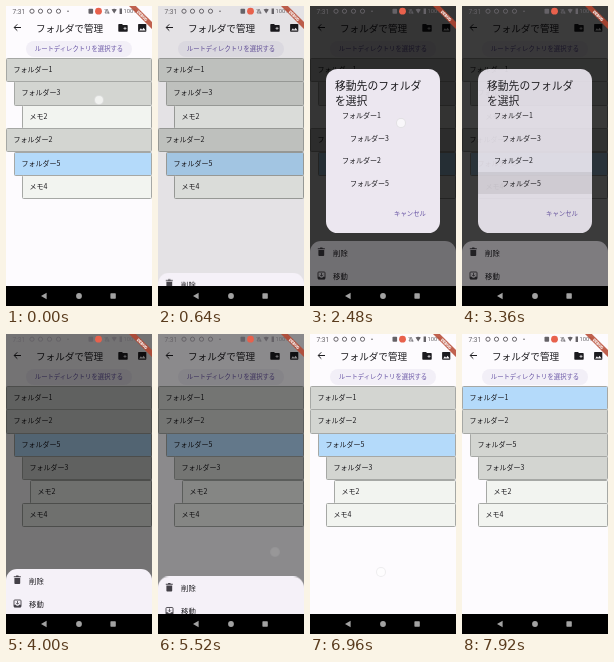
Write an HTML page that moves like this. It is 146 by 300 pixels and loops after 8 s.

```html
<!DOCTYPE html>
<html lang="ja">
<head>
<meta charset="utf-8">
<title>フォルダで管理</title>
<style>
  html, body { margin: 0; width: 100%; height: 100%; overflow: hidden; }
  #stage {
    position: relative; width: 146px; height: 300px; overflow: hidden;
    background: #fdfbfe; color: #1c1b1f;
    font: 7px/1 "Noto Sans CJK JP", "Noto Sans CJK", sans-serif;
  }
  #stage div, #stage svg { position: absolute; box-sizing: border-box; }
  .full { inset: 0; }
  .label { white-space: nowrap; line-height: 12px; height: 12px; }
  .anim { animation: 8s linear infinite both; }

  #title { left: 30px; top: 16px; font-size: 9.6px; }
  #pick {
    left: 20px; top: 35px; width: 106px; height: 16px; border-radius: 8px;
    background: #f2eff7; color: #6753a4; font-size: 6.35px;
    line-height: 16px; text-align: center; white-space: nowrap;
  }
  .row {
    right: 0; height: 24.3px; padding-left: 6.5px; line-height: 21.5px;
    border: 1px solid #a6a8a5; border-radius: 1.5px;
    background: #d3d5d1; white-space: nowrap;
  }
  .memo { background: #f2f4f0; }
  .picked { background: #b4dafa; }

  #before { animation-name: before; }
  #after { animation-name: after; }
  #after .folder1 { animation-name: select; }
  #after .folder5 { animation-name: deselect; }
  .shade { background: #000; }
  #shade1 { animation-name: shade; }
  #sheet {
    left: 0; top: 235px; width: 146px; height: 60px;
    border-radius: 11px 11px 0 0; background: #f5f1f8;
    animation-name: sheet; font-size: 7.4px;
  }
  #press { left: 0; top: 23px; width: 146px; height: 23px; background: #000; animation-name: press; }
  #modal { animation-name: modal; }
  #dialog {
    left: 16px; top: 63px; width: 114px; height: 164px; border-radius: 11.5px;
    background: #ece7f0; overflow: hidden;
  }
  #choice { left: 0; top: 103px; width: 114px; height: 22px; background: #000; animation-name: choice; }
  .head { font-size: 10.8px; line-height: 15px; white-space: nowrap; }
  #cancel { left: 68px; top: 139px; font-size: 6.4px; color: #6753a4; }
  #navbar { left: 0; top: 280px; width: 146px; height: 20px; background: #000; }

  .touch {
    width: 10px; height: 10px; margin: -5px; border-radius: 50%;
    background: rgba(255,255,255,.68); border: .6px solid rgba(120,120,120,.18);
  }

  @keyframes before { 0%, 42.99% { visibility: visible } 43%, 100% { visibility: hidden } }
  @keyframes after { 0%, 42.99% { visibility: hidden } 43%, 100% { visibility: visible } }
  @keyframes shade {
    0%, 7.5% { opacity: 0; animation-timing-function: ease-out }
    12%, 67% { opacity: .54; animation-timing-function: cubic-bezier(.8,0,1,1) }
    71%, 100% { opacity: 0 }
  }
  @keyframes sheet {
    0%, 7.5% { transform: translateY(46px); animation-timing-function: cubic-bezier(0,0,.2,1) }
    12.5%, 67% { transform: none; animation-timing-function: cubic-bezier(.8,0,1,1) }
    71%, 100% { transform: translateY(46px) }
  }
  @keyframes press { 0%, 17.5% { opacity: 0 } 20.5% { opacity: .04 } 23%, 100% { opacity: 0 } }
  @keyframes modal {
    0%, 20.8% { opacity: 0; animation-timing-function: ease-out }
    23%, 41% { opacity: 1; animation-timing-function: ease-in }
    45%, 100% { opacity: 0 }
  }
  @keyframes choice { 0%, 39% { opacity: 0 } 41%, 44% { opacity: .08 } 46%, 100% { opacity: 0 } }
  @keyframes select { 0%, 92.9% { background: #d3d5d1 } 95%, 100% { background: #b4dafa } }
  @keyframes deselect { 0%, 92.9% { background: #b4dafa } 95%, 100% { background: #d3d5d1 } }

  @keyframes hold { 0%, 2% { opacity: 1 } 3% { opacity: .4 } 5%, 100% { opacity: 0 } }
  @keyframes trace {
    0%, 27.5% { opacity: 0; transform: none }
    29%, 31% { opacity: 1; transform: none; animation-timing-function: ease-in-out }
    35.5% { opacity: 1; transform: translate(-24px, 62px) }
    38%, 100% { opacity: 0; transform: translate(-24px, 62px) }
  }
  @keyframes dismiss { 0%, 65.5% { opacity: 0 } 66.5%, 67.5% { opacity: .7 } 69% { opacity: .16 } 72%, 100% { opacity: 0 } }
  @keyframes blank { 0%, 79.5% { opacity: 0 } 81%, 85.5% { opacity: 1 } 90%, 100% { opacity: 0 } }
  @keyframes tap { 0%, 90.5% { opacity: 0 } 92%, 94% { opacity: 1 } 98.5%, 100% { opacity: 0 } }
</style>
</head>
<body>
<div id="stage">
  <svg class="full" width="146" height="300" fill="none" stroke="#1c1b1f">
    <path d="M15 21.5H8.3M11.3 18.3L8.1 21.5l3.2 3.2" stroke-width="1"/>
    <g fill="#1c1b1f" stroke="none">
      <path d="M113 18.1h3l1 1h4q.7 0 .7.7v5.2q0 .7-.7.7h-8q-.7 0-.7-.7v-6.2q0-.7.7-.7z"/>
      <path d="M132.8 17.9h6.8q.7 0 .7.7v6.4q0 .7-.7.7h-6.8q-.7 0-.7-.7v-6.4q0-.7.7-.7z"/>
    </g>
    <path d="M119 20.9v3M117.5 22.4h3" stroke="#fdfbfe" stroke-width=".7"/>
    <path d="M133.2 24.5l1.7-2.2 1.2 1.4 1.5-2 2 2.8z" fill="#fdfbfe" stroke="none"/>
  </svg>
  <div id="title" class="label">フォルダで管理</div>
  <div id="pick">ルートディレクトリを選択する</div>
  <div id="before" class="full anim"></div>
  <div id="after" class="full anim"></div>

  <div id="shade1" class="full shade anim"></div>
  <div id="sheet" class="anim">
    <div id="press" class="anim"></div>
    <svg width="24" height="46" style="left:0;top:0" fill="none" stroke="#434047">
      <path d="M8.4 9h5.8v5.2q0 .8-.8.8H9.2q-.8 0-.8-.8zM7.8 7.2h2l.5-.6h2l.5.6h2v1H7.8z" fill="#434047" stroke="none"/>
      <rect x="8" y="31" width="7" height="7" rx=".8" stroke-width=".9"/>
      <path d="M8 35.8h2l.6 1h1.8l.6-1h2v2.4H8z" fill="#434047" stroke="none"/>
      <path d="M11.5 32v3M10 33.8l1.5 1.5 1.5-1.5" stroke-width=".8"/>
    </svg>
    <div class="label" style="left:23px;top:5.5px">削除</div>
    <div class="label" style="left:23px;top:28.5px">移動</div>
  </div>

  <div id="modal" class="full anim">
    <div class="full shade" style="opacity:.54"></div>
    <div id="dialog">
      <div id="choice" class="anim"></div>
      <div class="head" style="left:9px;top:9px">移動先のフォルダ<br>を選択</div>
      <div id="cancel" class="label">キャンセル</div>
    </div>
  </div>

  <div class="touch anim" style="left:93px;top:94px;animation-name:hold"></div>
  <div class="touch anim" style="left:91px;top:117px;animation-name:trace"></div>
  <div class="touch anim" style="left:117px;top:218px;animation-name:dismiss"></div>
  <div class="touch anim" style="left:71px;top:238px;animation-name:blank"></div>
  <div class="touch anim" style="left:84px;top:65px;animation-name:tap"></div>

  <svg class="full" width="146" height="300" font-family="Roboto, sans-serif">
    <g fill="#656267" font-size="6.6">
      <text x="6.5" y="7.6">7:31</text>
      <text x="117.5" y="7.4" font-size="5.8">100%</text>
      <circle cx="62" cy="5.2" r=".8"/>
      <rect x="82.5" y="2.8" width="4.6" height="5" rx=".8"/>
      <path d="M105.6 3.6q2.6-1.8 5.2 0l-2.6 4zM113.6 2.6h2.4v5.4h-2.4z"/>
    </g>
    <g fill="none" stroke="#656267" stroke-width="1">
      <circle cx="26" cy="5.2" r="2.1"/>
      <circle cx="34.5" cy="5.2" r="2.1"/>
      <circle cx="43.5" cy="5.2" r="2.1"/>
      <circle cx="52.5" cy="5.2" r="2.1"/>
      <path d="M99 7l2-4 2 4zM98.6 3l4.6 4.8" stroke-width=".7"/>
    </g>
    <circle cx="92.5" cy="5.2" r="3.4" fill="#e8614c"/>
    <g transform="translate(146 0) rotate(45)">
      <rect x="-16.2" y="11.4" width="32.4" height="4.9" fill="#b5452f" fill-opacity=".85"/>
      <text x="0" y="15.3" font-size="4.1" font-weight="900" fill="#fff" text-anchor="middle">DEBUG</text>
    </g>
  </svg>
  <div id="navbar">
    <svg width="146" height="20" fill="#a2a2a2">
      <path d="M35 10l5.6-3.3v6.6z"/>
      <circle cx="73" cy="10" r="2.9"/>
      <rect x="104.4" y="7.3" width="5.4" height="5.4" rx=".6"/>
    </svg>
  </div>
</div>
<script>
  const $ = id => document.getElementById(id);

  function add(parent, className, text, style) {
    const el = document.createElement('div');
    el.className = className;
    el.textContent = text;
    Object.assign(el.style, style);
    parent.append(el);
  }

  // Each entry is a name and its depth in the tree.
  function buildTree(id, items, rowClass) {
    items.forEach(([name, depth], i) =>
      add($(id), 'row ' + rowClass(name), name,
        { left: depth * 8 + 'px', top: 52 + i * 23.4 + 'px' }));
  }

  const kind = name => name.startsWith('メモ') ? 'memo' : '';

  buildTree('before', [
    ['フォルダー1', 0], ['フォルダー3', 1], ['メモ2', 2],
    ['フォルダー2', 0], ['フォルダー5', 1], ['メモ4', 2]
  ], name => name === 'フォルダー5' ? 'picked' : kind(name));

  buildTree('after', [
    ['フォルダー1', 0], ['フォルダー2', 0], ['フォルダー5', 1],
    ['フォルダー3', 2], ['メモ2', 3], ['メモ4', 2]
  ], name => /[15]$/.test(name) ? 'anim folder' + name.slice(-1) : kind(name));

  [[1, 0], [3, 1], [2, 0], [5, 1]].forEach(([n, depth], i) =>
    add($('dialog'), 'label', 'フォルダー' + n,
      { left: 16 + depth * 8 + 'px', top: 40 + i * 22.7 + 'px' }));
</script>
</body>
</html>
```
